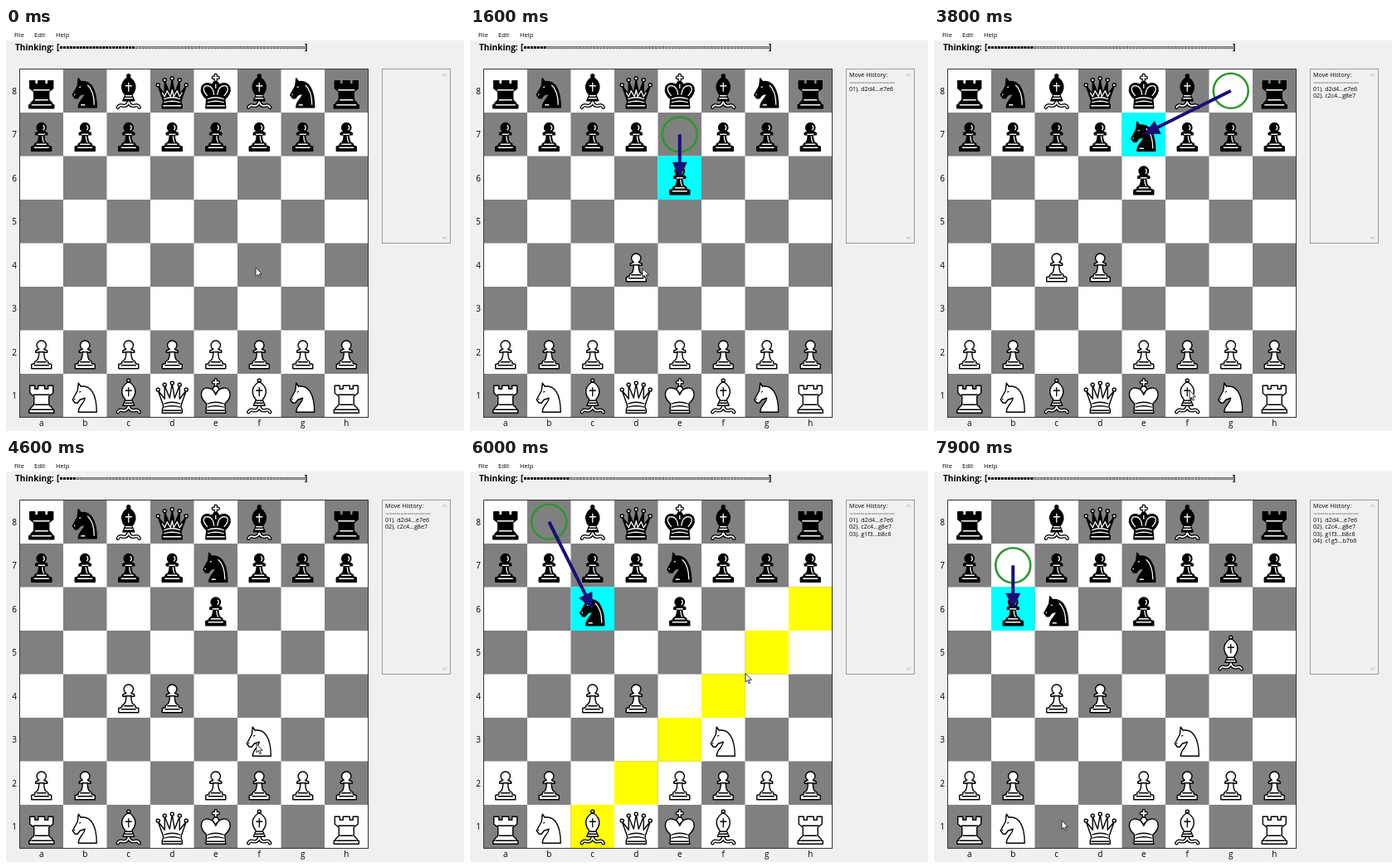
These frames come from a looping animation (552 by 486 pixels, 8 s). An HTML page with a canvas:

```html
<!DOCTYPE html>
<html lang="en">
<head>
<meta charset="utf-8">
<title>Chess game</title>
<style>
html, body { margin: 0; width: 552px; height: 486px; overflow: hidden; background: #f0f0f0; }
canvas { display: block; }
</style>
</head>
<body>
<canvas id="stage" width="552" height="486"></canvas>
<script>
const ctx = document.getElementById('stage').getContext('2d');
const LOOP = 8000, STEP = 100;
const X0 = 16.5, Y0 = 49.5, CELL = 52.5;
const FONT = '"Open Sans", "Noto Sans", sans-serif';

const dot = (x, y, r) => `M${x - r} ${y}a${r} ${r} 0 1 1 ${2 * r} 0a${r} ${r} 0 1 1 ${-2 * r} 0z`;

// body: filled outline, lines: inner details, shine: details of dark pieces, tube: white core with a black rim
const SHAPES = {
  p: {
    body: 'M-3-4.5a5.7 5.5 0 1 1 6 0l4 2v2h-4q0 6 2 9l3 2v2l4 1.5v5h-24v-5l4-1.5v-2l3-2q2-3 2-9h-4v-2z',
    lines: 'M-4-1h8M-6 11h12M-9 15h18',
    shine: 'M2-12q3 3 0 6M1 1q0 5 2 8'
  },
  r: {
    body: 'M-14-13h6v4h4v-4h8v4h4v-4h6v9l-5 4v10l4 4v2h2v4h-30v-4h2v-2l4-4v-10l-5-4z',
    lines: 'M-10-2h20M-8 10h16M-12 16h24'
  },
  n: {
    body: 'M-8-16l3 4c11-2 19 8 19 31h-22c0-8 7-10 8-17l-6 2l-3 4h-3l-3-4l6-11z',
    lines: 'M-7-5l2-1M-13 4l1-1',
    shine: 'M3-8q8 7 8 24M-5 16h5'
  },
  b: {
    tube: 'M0 12Q-2 18-7 17Q-11 15-13 19M0 12Q2 18 7 17Q11 15 13 19',
    body: 'M0-18c6 4 9 8 8 14q-1 5-4 8l3 7h-14l3-7q-3-3-4-8c-1-6 2-10 8-14z' + dot(0, -19, 2),
    lines: 'M0-11v11M-4-7h8M-4 5h8M-5 8h10'
  },
  q: {
    body: 'M-17-7L-9 3L-9-13L-3 2L0-15L3 2L9-13L9 3L17-7L11 10q-1 3 1 6v4h-24v-4q2-3 1-6z',
    balls: [[-17, -8], [-9, -14], [0, -16], [9, -14], [17, -8]].map(b => dot(b[0], b[1], 2)).join(''),
    lines: 'M-10 9q10-4 20 0M-10 13q10-3 20 0M-11 17h22',
    shine: 'M-12 1l3 5l3-7l4 7l2-8l2 8l4-7l3 7l3-5'
  },
  k: {
    tube: 'M0-20v9M-3-17h6',
    body: 'M-11 9C-22-1-17-11-9-10Q-2-9 0-2Q2-9 9-10C17-11 22-1 11 9L12 20H-12zM0-2L-4-9Q0-16 4-9z',
    lines: 'M-10 9q10-4 20 0M-10 13q10-3 20 0M-11 17h22',
    shine: 'M-10 5C-18-3-14-8-9-7Q-3-6-2 4M10 5C18-3 14-8 9-7Q3-6 2 4M0-9v5'
  }
};
for (const s of Object.values(SHAPES))
  for (const k in s) s[k] = new Path2D(s[k]);

const MOVES = [
  { pick: 600, drop: 1100, reply: 1600, white: 'd2d4', black: 'e7e6', free: 'd3 d4' },
  { pick: 2200, drop: 2750, reply: 3300, white: 'c2c4', black: 'g8e7', free: 'c3 c4' },
  { pick: 4000, drop: 4250, reply: 4900, white: 'g1f3', black: 'b8c6', free: 'f3 h3' },
  { pick: 5600, drop: 6050, reply: 6400, white: 'c1g5', black: 'b7b6', free: 'd2 e3 f4 g5 h6' }
];

// time, x, y of the pointer tip
const POINTER = [
  [0, 301, 289], [100, 301, 289], [550, 205, 394], [650, 205, 394], [900, 214, 321],
  [1100, 211, 287], [1600, 208, 290], [2150, 156, 394], [2250, 156, 394], [2500, 157, 324],
  [2750, 153, 287], [3200, 160, 295], [3800, 308, 437], [4000, 356, 444], [4250, 306, 340],
  [4750, 300, 345], [5300, 183, 425], [5550, 150, 444], [5650, 150, 444], [6050, 358, 232],
  [6600, 358, 232], [7600, 154, 436], [8000, 154, 436]
];

const cellOf = s => [s.charCodeAt(0) - 97, 8 - s[1]];
const centre = s => cellOf(s).map((v, i) => (i ? Y0 : X0) + (v + 0.5) * CELL);

function text(str, x, y, size, weight = 400, align = 'left', family = FONT) {
  ctx.font = `${weight} ${size}px ${family}`;
  ctx.textAlign = align;
  ctx.textBaseline = 'alphabetic';
  ctx.fillStyle = '#000';
  ctx.fillText(str, x, y);
}

function boardAt(t) {
  const b = {};
  [...'abcdefgh'].forEach((f, i) => {
    b[f + 8] = 'rnbqkbnr'[i];
    b[f + 7] = 'p';
    b[f + 2] = 'P';
    b[f + 1] = 'RNBQKBNR'[i];
  });
  const play = m => {
    b[m.slice(2)] = b[m.slice(0, 2)];
    delete b[m.slice(0, 2)];
  };
  for (const m of MOVES) {
    if (t >= m.drop) play(m.white);
    if (t >= m.reply) play(m.black);
  }
  return b;
}

function piece(sq, code) {
  const s = SHAPES[code.toLowerCase()];
  const dark = code === code.toLowerCase();
  const [x, y] = centre(sq);
  const line = (path, color, width) => {
    ctx.strokeStyle = color;
    ctx.lineWidth = width;
    ctx.stroke(path);
  };
  const solid = (path, fill) => {
    ctx.fillStyle = fill;
    ctx.fill(path);
    line(path, '#000', 1.4);
  };
  ctx.save();
  ctx.translate(x, y + 1);
  ctx.lineJoin = 'round';
  if (s.tube) {
    ctx.lineCap = 'round';
    line(s.tube, '#000', 4.4);
    line(s.tube, '#fff', 1.8);
    ctx.lineCap = 'butt';
  }
  solid(s.body, dark ? '#000' : '#fff');
  if (s.balls) solid(s.balls, '#fff');
  line(s.lines, dark ? '#fff' : '#000', 1.3);
  if (dark && s.shine) line(s.shine, '#fff', 1.3);
  ctx.restore();
}

function fillCell(c, r, color) {
  ctx.fillStyle = color;
  ctx.fillRect(X0 + c * CELL, Y0 + r * CELL, CELL, CELL);
}

function arrow(move) {
  const [x1, y1] = centre(move.slice(0, 2)), [x2, y2] = centre(move.slice(2));
  const len = Math.hypot(x2 - x1, y2 - y1);
  ctx.strokeStyle = '#2c982c';
  ctx.lineWidth = 2.6;
  ctx.beginPath();
  ctx.arc(x1, y1, 21, 0, 7);
  ctx.stroke();
  ctx.save();
  ctx.translate(x2, y2);
  ctx.rotate(Math.atan2(y2 - y1, x2 - x1));
  ctx.fillStyle = '#1a0f78';
  ctx.fillRect(-len, -2, len - 15, 4);
  ctx.beginPath();
  ctx.moveTo(0, 0);
  ctx.lineTo(-19, -9);
  ctx.lineTo(-19, 9);
  ctx.fill();
  ctx.restore();
}

function header(t) {
  ctx.fillStyle = '#fff';
  ctx.fillRect(0, 0, 552, 15);
  text('File', 10, 10.5, 7.5, 500);
  text('Edit', 34, 10.5, 7.5, 500);
  text('Help', 60, 10.5, 7.5, 500);
  text('Thinking:', 11, 27, 10.1, 700);
  text('[', 61, 27, 10.1, 700);
  text(']', 360, 27, 10.1, 700);
  const last = MOVES.filter(m => t >= m.drop).pop();
  const full = last ? Math.min(14, Math.floor((t - last.drop) / 70)) : 23;
  const pitch = 3.95;
  ctx.lineWidth = 0.8;
  ctx.strokeStyle = '#444';
  ctx.fillStyle = '#000';
  for (let i = 0; i < 75; i++) {
    const x = 65 + i * pitch;
    if (i < full) ctx.fillRect(x, 22, 3, 3);
    else ctx.strokeRect(x + 0.4, 22.4, 2.3, 2.3);
  }
}

function history(t) {
  ctx.strokeStyle = '#9a9a9a';
  ctx.lineWidth = 1;
  ctx.strokeRect(453.5, 49.5, 82, 210);
  ctx.strokeStyle = '#b4b4b4';
  ctx.beginPath();
  for (const [y, d] of [[58, -3], [251.5, 3]]) {
    ctx.moveTo(526, y);
    ctx.lineTo(528.5, y + d);
    ctx.lineTo(531, y);
  }
  ctx.stroke();
  const done = MOVES.filter(m => t >= m.reply);
  if (!done.length) return;
  text('Move History:', 457, 58.5, 7.2, 500);
  text('-'.repeat(21), 457.5, 67.5, 7.2, 400, 'left', '"DejaVu Sans", sans-serif');
  done.forEach((m, i) => text(`0${i + 1}). ${m.white}...${m.black}`, 457, 75.5 + i * 8.5, 7.2, 500));
}

function pointer(t) {
  let i = 1;
  while (i < POINTER.length - 1 && POINTER[i][0] < t) i++;
  const [ta, xa, ya] = POINTER[i - 1], [tb, xb, yb] = POINTER[i];
  const k = (t - ta) / (tb - ta);
  ctx.save();
  ctx.translate(xa + (xb - xa) * k, ya + (yb - ya) * k);
  const p = new Path2D('M0 0v10.5l2.4-2.2l1.7 4l1.6-.7l-1.7-3.8h3.4z');
  ctx.fillStyle = '#fff';
  ctx.strokeStyle = '#222';
  ctx.lineWidth = 0.9;
  ctx.fill(p);
  ctx.stroke(p);
  ctx.restore();
}

function draw(t) {
  ctx.fillStyle = '#f0f0f0';
  ctx.fillRect(0, 0, 552, 486);
  header(t);
  history(t);

  ctx.fillStyle = '#fff';
  ctx.fillRect(X0, Y0, 8 * CELL, 8 * CELL);
  for (let r = 0; r < 8; r++)
    for (let c = 1 - r % 2; c < 8; c += 2) fillCell(c, r, '#808080');
  const held = MOVES.find(m => t >= m.pick && t < m.drop);
  const shown = MOVES.find((m, i) => t >= m.reply && !(MOVES[i + 1] && t >= MOVES[i + 1].drop));
  if (shown) fillCell(...cellOf(shown.black.slice(2)), '#0ff');
  if (held)
    for (const s of [held.white.slice(0, 2), ...held.free.split(' ')]) fillCell(...cellOf(s), '#ff0');

  ctx.strokeStyle = '#333';
  ctx.lineWidth = 1;
  ctx.strokeRect(X0, Y0, 8 * CELL, 8 * CELL);
  for (let i = 0; i < 8; i++) {
    const mid = (i + 0.5) * CELL;
    text(8 - i, 10, Y0 + mid + 4, 10, 400, 'center');
    text('abcdefgh'[i], X0 + mid, 479.5, 10, 400, 'center');
  }

  for (const [sq, code] of Object.entries(boardAt(t))) piece(sq, code);
  if (shown) arrow(shown.black);
  pointer(t);
}

const start = performance.now();
function tick() {
  const t = (performance.now() - start) % LOOP;
  draw(Math.floor(t / STEP) * STEP);
  requestAnimationFrame(tick);
}
tick();
</script>
</body>
</html>
```
